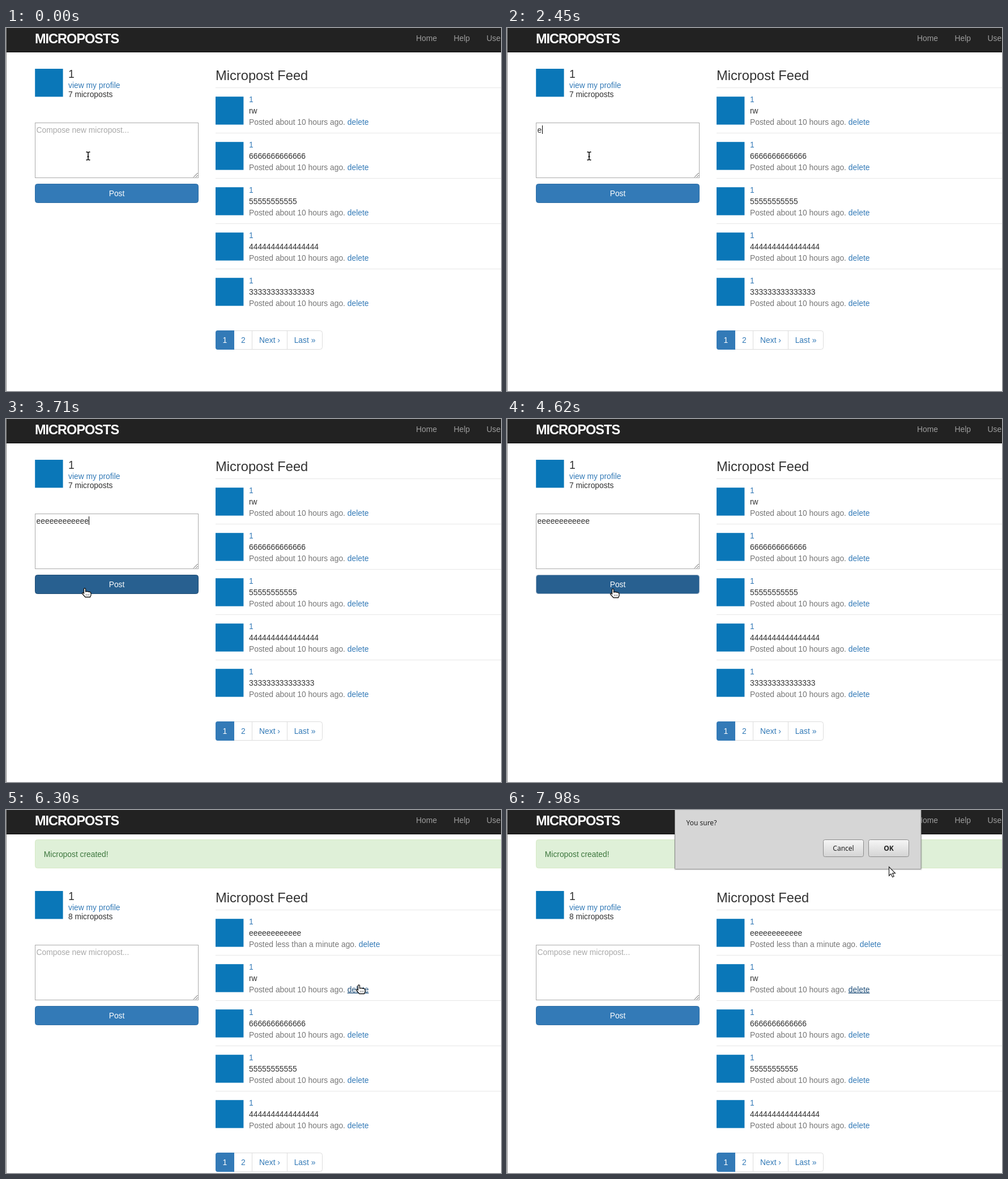
Write an HTML page that moves like this. It is 874 by 641 pixels and loops after 8 s.

```html
<!DOCTYPE html>
<html lang="en">
<head>
<meta charset="utf-8">
<title>Micropost feed</title>
<style>
  html, body { margin: 0; width: 100%; height: 100%; overflow: hidden; background: #fff; }
  svg { display: block; width: 874px; height: 641px; }
  text { font: 13.83px "Liberation Sans", Arial, sans-serif; fill: #333; white-space: pre; }
  .brand { font-size: 23.5px; font-weight: bold; letter-spacing: -.99px; fill: #fff; }
  .nav { fill: #9d9d9d; }
  .name { font-size: 19.4px; }
  .title { font-size: 23.7px; }
  .link { fill: #337ab7; }
  .hover { fill: #23527c; text-decoration: underline; }
  .time { fill: #777; }
  .hint { fill: #a9a9a9; }
  .light { fill: #fff; }
  .good { fill: #3c763d; }
  .mid { text-anchor: middle; }
  .dlg { font: 12px "Noto Sans", "Open Sans", sans-serif; fill: #222; }
  .bold { font-weight: bold; }
</style>
</head>
<body>
<svg id="stage" viewBox="0 0 874 641"></svg>
<script>
const LOOP = 8000, STEP = 70, ROW = 80;
const FOCUS = 840, TYPE = 2450, REPEAT = 2940, PRESS = 3850, BLUR = 3990,
      CREATED = 5250, DIALOG = 6860;
const POSTS = ["eeeeeeeeeeee", "rw", "6666666666666", "55555555555", "4444444444444444", "333333333333333"];

// Pointer stops: time, x, y, shape
const STOPS = [
  [0, 145, 226, "beam"], [3220, 145, 226, "beam"], [3360, 142, 285, "hand"],
  [3500, 139, 309, "arrow"], [3640, 139, 309, "arrow"], [3710, 139, 299, "hand"],
  [3780, 139, 299, "hand"], [4130, 144, 304, "hand"], [4550, 144, 304, "hand"],
  [4620, 187, 300, "hand"], [4690, 300, 290, "hand"], [4760, 393, 282, "arrow"],
  [4900, 393, 282, "arrow"], [5110, 506, 234, "beam"], [5250, 506, 234, "beam"],
  [5880, 624, 275, "arrow"], [6020, 624, 275, "arrow"], [6230, 624, 306, "hand"],
  [6300, 623, 309, "hand"], [7420, 623, 309, "hand"], [7630, 640, 173, "hand"],
  [7770, 640, 173, "hand"], [7980, 674, 100, "arrow"], [LOOP, 674, 100, "arrow"]
];

const SHAPES = {
  beam: ["white", "black"].map((c, i) =>
    `<path d="M-3.5 -7H-1.5L0 -6L1.5 -7H3.5M0 -6V6M-3.5 7H-1.5L0 6L1.5 7H3.5M-1.5 1H1.5"
      fill="none" stroke="${c}" stroke-width="${i ? 1.5 : 3.5}"/>`).join(""),
  hand: `<path d="M-1.5 .8Q0 -1 1.5 .8V6L4 5.3L6.5 6L9 6.4Q11 7 11 9V12L9.5 15.5H1L-4.4 9.5Q-4.5 7 -2.5 8L-1.5 9Z"
      fill="#fff" stroke="#111" stroke-width="1.3"/><path d="M2.5 10V13M5 10V13M7.5 10V13" stroke="#777"/>`,
  arrow: `<path d="M.5 .5V16L4 12.7L6.6 18.5L9.2 17.3L6.7 11.7H11.5Z" fill="#fff" stroke="#222" stroke-width="1.2"/>`
};

const text = (x, y, s, cls = "") => `<text x="${x}" y="${y}" class="${cls}">${s}</text>`;
const rect = (x, y, w, h, fill, more = "") =>
  `<rect x="${x}" y="${y}" width="${w}" height="${h}" fill="${fill}" ${more}/>`;
const box = (x, y, w, h, fill, line, r = 0) =>
  rect(x + .5, y + .5, w - 1, h - 1, fill, `stroke="${line}" rx="${r}"`);
const avatar = (x, y) => rect(x, y, 49.4, 49.4, "#0a77b8");

function pointer(t) {
  const i = STOPS.findIndex(s => s[0] > t);
  const [t0, x0, y0, shape] = STOPS[i - 1], [t1, x1, y1] = STOPS[i];
  const k = (t - t0) / (t1 - t0);
  return { x: x0 + (x1 - x0) * k, y: y0 + (y1 - y0) * k, shape };
}

const header = () =>
  rect(0, 0, 874, 43, "#222") + rect(0, 42, 874, 1, "#080808") +
  text(51, 26.5, "MICROPOSTS", "brand") +
  text(724, 22.7, "Home", "nav") + text(790.5, 22.7, "Help", "nav") + text(848.6, 22.7, "Users", "nav");

const profile = count =>
  avatar(51.2, 72) + text(110, 88, "1", "name") +
  text(110, 105.5, "view my profile", "link") + text(110, 122.3, count + " microposts");

function composer(t, hovered) {
  const open = t < CREATED;
  const n = !open || t < TYPE ? 0 : t < REPEAT ? 1 : Math.min(12, 2 + Math.floor((t - REPEAT) / 33));
  const focused = t >= FOCUS && t < BLUR, blinkOff = t >= 1400 && t < 2030;
  const blurred = open && t >= BLUR;
  let fill = "#337ab7", line = "#2e6da4";
  if (blurred) [fill, line] = ["#286090", "#8fa6bd"];
  else if (open && t >= PRESS) [fill, line] = ["#204d74", "#122b40"];
  else if (open && hovered) [fill, line] = ["#286090", "#204d74"];
  return box(51, 167, 289, 98, "#fff", "#aaa") +
    `<path d="M331 263.5L338.5 256M335 263.5L338.5 260" stroke="#555"/>` +
    (n ? text(53.6, 184.6, "e".repeat(n)) : text(53.6, 184.6, "Compose new micropost...", "hint")) +
    (focused && !blinkOff ? rect(Math.round(54 + n * 7.69), 172, 1, 15, "#000") : "") +
    box(51, 275, 289, 34, fill, line, 4) + text(195.5, 297, "Post", "light mid");
}

const post = (body, y, fresh, hover) =>
  rect(370, y, 504, 1, "#e7e7e7") + avatar(370, y + 16.2) +
  text(429, y + 26, "1", "link") + text(429, y + 45.7, body) +
  text(429, y + 65.5, `Posted ${fresh ? "less than a minute" : "about 10 hours"} ago. ` +
    `<tspan class="link ${hover ? "hover" : ""}">delete</tspan>`, "time");

const pager = () =>
  box(370, 534, 189, 34, "#fff", "#ddd", 4) +
  `<path d="M374 534H403V568H374Q370 568 370 564V538Q370 534 374 534" fill="#337ab7"/>` +
  [434, 496].map(x => rect(x, 534, 1, 34, "#ddd")).join("") +
  text(386.3, 556.3, "1", "light mid") + text(418.8, 556.3, "2", "link mid") +
  text(465.5, 556.3, "Next ›", "link mid") + text(527.5, 556.3, "Last »", "link mid");

function dialog(t) {
  if (t < DIALOG) return "";
  const a = Math.min(1, .3 + (t - DIALOG) / 200), s = .95 + .05 * a;
  const button = (x, label, cls) => box(x, 52, 72, 31, "url(#btn)", "#8c8c8c", 3) +
    text(x + 36, 72, label, "dlg mid " + cls);
  return `<g opacity="${a}" transform="translate(513.7 45) scale(${s}) translate(-513.7 -45)">` +
    rect(295, -40, 438, 146.5, "#000", 'opacity=".1" rx="2"') +
    box(296, -40, 435.5, 145, "#d6d6d6", "#8e8e8e", 1) +
    text(316.5, 26.5, "You sure?", "dlg") +
    button(558, "Cancel", "") + button(638, "OK", "bold") + "</g>";
}

function scene(t) {
  const p = pointer(t), created = t >= CREATED;
  const onButton = p.x > 51 && p.x < 340 && p.y > 275 && p.y < 309;
  const onDelete = t >= 6230;
  const list = created ? POSTS.slice(0, 5) : POSTS.slice(1);
  const alert = created
    ? box(51, 52, 900, 51, "#dff0d8", "#d6e9c6", 4) + text(66.8, 83, "Micropost created!", "good") : "";
  return `<defs><linearGradient id="btn" x2="0" y2="1"><stop stop-color="#f6f6f6"/>
      <stop offset="1" stop-color="#d4d4d4"/></linearGradient></defs>` +
    rect(0, 0, 874, 641, "#fff") + header() + alert +
    `<g transform="translate(0 ${created ? 71 : 0})">` +
    profile(created ? 8 : 7) + composer(t, onButton) +
    text(370, 92, "Micropost Feed", "title") +
    list.map((body, i) => post(body, 105 + i * ROW, created && !i, onDelete && i === 1)).join("") +
    pager() + "</g>" + rect(0, 0, 1, 641, "#8a8a8a") + dialog(t) +
    `<g transform="translate(${p.x} ${p.y})">${SHAPES[p.shape]}</g>`;
}

const stage = document.getElementById("stage");
let shown = -1;
function draw() {
  const t = Math.floor(performance.now() % LOOP / STEP) * STEP;
  if (t !== shown) stage.innerHTML = scene(shown = t);
  requestAnimationFrame(draw);
}
draw();
</script>
</body>
</html>
```
